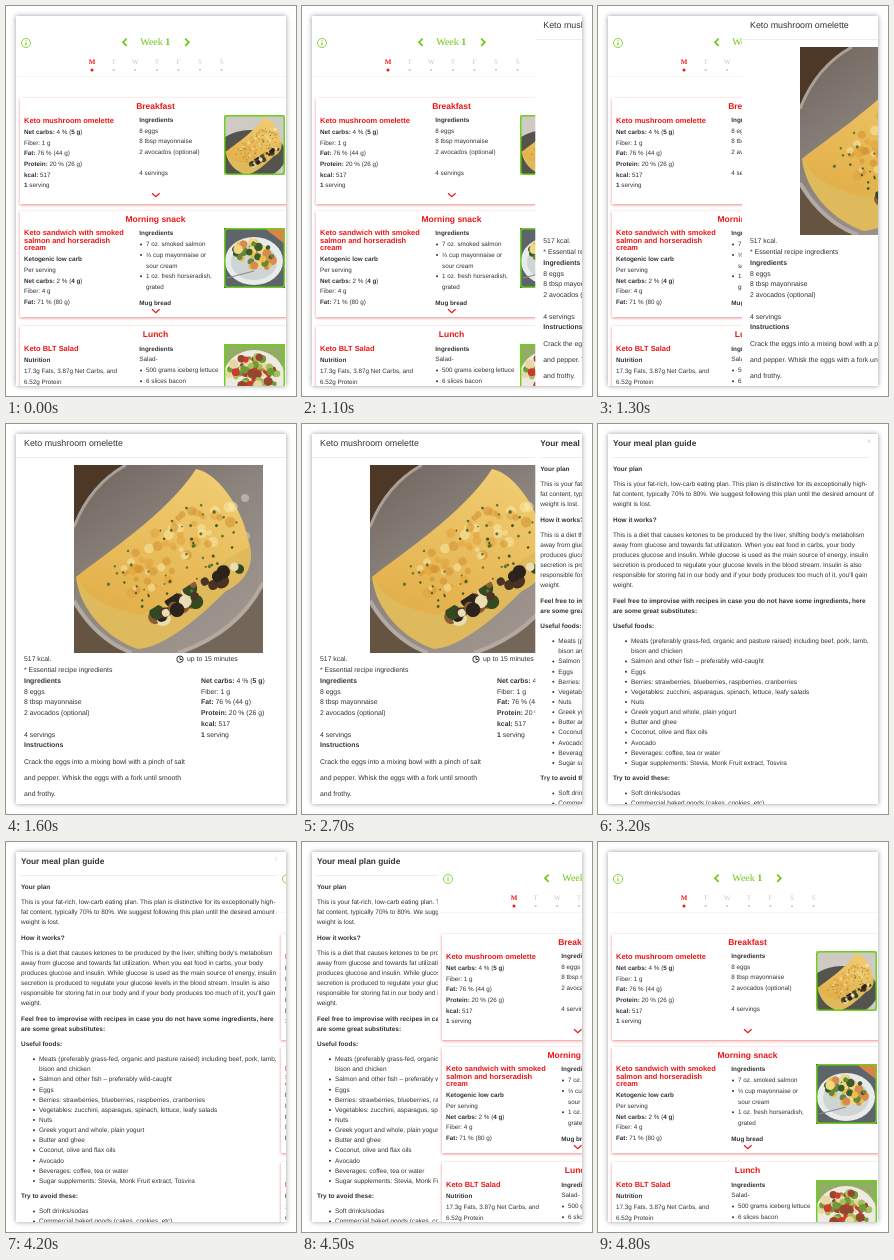
An HTML page that plays this animation: 290 by 390 pixels, repeating every 4900 ms.

```html
<!DOCTYPE html>
<html lang="en">
<head>
<meta charset="utf-8">
<title>Meal plan</title>
<style>
  html, body { margin: 0; width: 100%; height: 100%; overflow: hidden; background: #fff; }
  #stage { position: absolute; left: 0; top: 0; width: 290px; height: 390px; }
  #frame { position: absolute; left: 10px; top: 10px; width: 270px; height: 370px; box-shadow: 0 0 5px rgba(0, 0, 0, .4); }
  text { font-family: "Liberation Sans", Arial, sans-serif; fill: #333; white-space: pre; text-rendering: geometricPrecision; }
  .serif { font-family: "Liberation Serif", "Times New Roman", serif; }
  .red { fill: #ee1515; font-weight: 700; }
  .mid { text-anchor: middle; }
  .card { fill: #fff; filter: drop-shadow(0 1.5px 1.5px rgba(225, 60, 60, .6)); }
  .line { fill: none; stroke-width: 1.2; }
</style>
</head>
<body>
<div id="frame"></div>
<svg id="stage" viewBox="0 0 290 390"></svg>
<script>
const stage = document.getElementById('stage');

// Underscores mark bold runs; y is the middle of the line.
const text = (x, y, s, size, cls = '') =>
  `<text x="${x}" y="${y + size * .36}" font-size="${size}" class="${cls}">` +
  s.replace(/_(.+?)_/g, '<tspan font-weight="700">$1</tspan>') + '</text>';

const rows = (x, y, step, size, lines, cls) => lines.map((s, i) => {
  const bullet = s.startsWith('•');
  const dot = bullet ? circle(x - 5, y + i * step + .4, 1, '#333') : '';
  return dot + (s && text(x, y + i * step, bullet ? s.slice(1) : s, size, cls));
}).join('');

const circle = (x, y, r, fill, extra = '') => `<circle cx="${x}" cy="${y}" r="${r}" fill="${fill}" ${extra}/>`;
const rect = (x, y, w, h, fill) => `<rect x="${x}" y="${y}" width="${w}" height="${h}" fill="${fill}"/>`;
const path = (d, fill, extra = '') => `<path d="${d}" fill="${fill}" ${extra}/>`;
const line = (d, color, width = 1.2) => `<path d="${d}" class="line" stroke="${color}" style="stroke-width:${width}"/>`;

function random(seed) {
  return () => (seed = seed * 16807 % 2147483647) / 2147483647;
}

// Scatter small spots inside a tilted ellipse.
function spots(n, cx, cy, rx, ry, tilt, size, colors, seed) {
  const rnd = random(seed);
  for (let i = 0; i < 5; i++) rnd();
  let out = '';
  for (let i = 0; i < n; i++) {
    const a = rnd() * 6.283, d = Math.sqrt(rnd());
    out += circle((Math.cos(a) * d * rx).toFixed(1), (Math.sin(a) * d * ry).toFixed(1),
      (size * (.5 + rnd() * .7)).toFixed(1), colors[i % colors.length]);
  }
  return `<g transform="translate(${cx} ${cy}) rotate(${tilt})">${out}</g>`;
}

const photo = (x, y, w, h, body) => `<svg x="${x}" y="${y}" width="${w}" height="${h}">${body}</svg>`;
const thumb = (y, body) => photo(218, y, 61, 60, body) +
  `<rect x="218.7" y="${y + .7}" width="59.6" height="58.6" rx="3" class="line" stroke="#6cd01c" style="stroke-width:1.5"/>`;

const omelette =
  path('M2 112C6 146 34 174 64 184C92 182 128 150 152 126C174 116 182 96 174 74Z', '#dfba5c') +
  spots(34, 118, 130, 58, 9, -31, 6.5, ['#4a3322', '#eadcb4', '#2c241c', '#8a5c36', '#33491f'], 5) +
  path('M2 112C32 88 94 48 122 4C145 8 172 48 175 82C154 92 112 124 68 150C44 146 14 136 2 112Z', 'url(#egg)') +
  spots(60, 102, 82, 72, 24, -38, 4.5, ['#d18f2e88', '#fae9a888', '#e0a23a88'], 11) +
  spots(50, 100, 92, 78, 38, -36, 1.5, ['#3f5a22', '#5d7432'], 23);

const bigPhoto = photo(68, 41, 189, 188,
  rect(0, 0, 189, 188, 'url(#pan)') +
  path('M0 0H52Q16 20 0 62Z', '#4d3828') + line('M52 0Q16 20 0 62', '#aaa097', 3) +
  path('M0 136Q22 174 58 188H0Z', '#665443') + line('M0 136Q22 174 58 188', '#b3aaa3', 4) +
  path('M189 118Q164 168 104 188H189Z', '#75665a') + line('M189 118Q164 168 104 188', '#b5aaa1', 4) +
  circle(171, 33, 4, '#b8afa8') + circle(172, 71, 4, '#b8afa8') + omelette);

const thumbs = [
  rect(0, 0, 61, 60, '#cfcac4') +
  '<ellipse cx="26" cy="40" rx="36" ry="25" fill="#55534d"/>' +
  `<g transform="translate(1 1) scale(.32)">${omelette}</g>`,

  rect(0, 0, 61, 60, '#5d656b') + path('M40 0H61V16Z', '#d98446') +
  '<ellipse cx="30" cy="33" rx="29" ry="24" fill="#e9ebea"/><ellipse cx="30" cy="34" rx="23" ry="18" fill="#cfd4d4"/>' +
  spots(48, 30, 27, 20, 14, 15, 4, ['#e9bf4a', '#f2d77e', '#66883a', '#d98a4c', '#385c2b'], 17) +
  line('M3 50L30 43', '#8d8d8d'),

  rect(0, 0, 61, 60, '#8fae62') +
  '<ellipse cx="30" cy="34" rx="31" ry="28" fill="#eeeae3"/>' +
  spots(75, 31, 29, 26, 18, 0, 4, ['#6e9a38', '#c93b2c', '#e8d7a0', '#a6bf5a', '#96452f'], 29)
];

const red = '#ee1515', green = '#6cc811';
const chevron = y => line(`M146 ${y - 1.7}L149.8 ${y + 1.7}L153.6 ${y - 1.7}`, red);
const card = (y, title) =>
  `<rect class="card" x="14" y="${y}" width="275" height="106"/>` + text(149.5, y + 7.7, title, 8.5, 'red mid');

const days = [...'MTWTFSS'].map((d, i) => {
  const x = 86 + i * 21.6, on = !i;
  const color = on ? red : '#c8c8c8';
  return `<text x="${x}" y="58" font-size="7" class="serif mid" style="fill:${color};font-weight:${on ? 700 : 400}">${d}</text>` +
    circle(x, 64, on ? 1.5 : 1.1, color);
}).join('');

const macros = ['_Net carbs:_ 4 % (_5 g_)', 'Fiber: 1 g', '_Fat:_ 76 % (44 g)', '_Protein:_ 20 % (26 g)', '_kcal:_ 517', '_1_ serving'];
const omeletteItems = ['_Ingredients_', '8 eggs', '8 tbsp mayonnaise', '2 avocados (optional)', '', '4 servings'];

const S = 6.3;
const week =
  circle(20, 37, 4.5, 'none', `stroke="${green}" stroke-width=".8"`) +
  circle(20, 34.8, .6, green) + line('M20 36.3V39.6', green, 1) +
  line('M120.6 32.6L117 36.2L120.6 39.8M179.2 32.6L182.8 36.2L179.2 39.8', green, 1.7) +
  `<text x="134.3" y="39" font-size="10" class="serif" style="fill:${green}">Week <tspan font-weight="700">1</tspan></text>` +
  days + rect(12, 70, 268, .7, '#f1f1f1') +

  card(92, 'Breakfast') + text(18, 114, 'Keto mushroom omelette', 7.46, 'red') +
  rows(18, 125.7, 10.7, S, macros) + rows(133.3, 114, 10.6, S, omeletteItems) + chevron(189) + thumb(109, thumbs[0]) +

  card(205, 'Morning snack') +
  rows(18, 226.7, 7.4, 7.46, ['Keto sandwich with smoked', 'salmon and horseradish', 'cream'], 'red') +
  rows(18, 253, 10.65, S, ['_Ketogenic low carb_', 'Per serving', '_Net carbs:_ 2 % (_4 g_)', 'Fiber: 4 g', '_Fat:_ 71 % (80 g)']) +
  text(133.3, 227, '_Ingredients_', S) +
  rows(140, 238, 10.65, S, ['•7 oz. smoked salmon', '•⅓ cup mayonnaise or', 'sour cream', '•1 oz. fresh horseradish,', 'grated']) +
  text(133.3, 296.3, '_Mug bread_', S) + chevron(305) + thumb(222, thumbs[1]) +

  card(320, 'Lunch') + text(18, 342.5, 'Keto BLT Salad', 7.46, 'red') +
  rows(18, 353.8, 10.9, S, ['_Nutrition_', '17.3g Fats, 3.87g Net Carbs, and', '6.52g Protein']) +
  rows(133.3, 342.5, 10.7, S, ['_Ingredients_', 'Salad-']) +
  rows(140, 364.2, 10.7, S, ['•500 grams iceberg lettuce', '•6 slices bacon']) + thumb(338, thumbs[2]);

const R = 6.87;
const recipe =
  text(18, 18.6, 'Keto mushroom omelette', 8.86) + rect(10, 33, 270, .8, '#e9e9e9') + bigPhoto +
  rows(18, 235, 10.75, R, ['517 kcal.', '* Essential recipe ingredients', ...omeletteItems, '_Instructions_']) +
  circle(174, 235.2, 3.2, 'none', 'stroke="#333" stroke-width="1"') + line('M174 233V235.5H176', '#333', 1) +
  text(181, 235, 'up to 15 minutes', R) +
  rows(195, 256.5, 10.75, R, macros) +
  rows(18, 337.3, 16.1, R, ['Crack the eggs into a mixing bowl with a pinch of salt', 'and pepper. Whisk the eggs with a fork until smooth', 'and frothy.']);

const G = 6.45, L = 10.15;
const guide =
  text(15, 18.6, '_Your meal plan guide_', 8.3) + rect(15, 33, 256, .8, '#e9e9e9') +
  line('M269.5 15.5L273 19M273 15.5L269.5 19', '#ccc', .7) +
  text(15, 45, '_Your plan_', G) +
  rows(15, 59.7, L, G, [
    'This is your fat-rich, low-carb eating plan. This plan is distinctive for its exceptionally high-',
    'fat content, typically 70% to 80%. We suggest following this plan until the desired amount of',
    'weight is lost.']) +
  text(15, 95.2, '_How it works?_', G) +
  rows(15, 110.3, L, G, [
    'This is a diet that causes ketones to be produced by the liver, shifting body\'s metabolism',
    'away from glucose and towards fat utilization. When you eat food in carbs, your body',
    'produces glucose and insulin. While glucose is used as the main source of energy, insulin',
    'secretion is produced to regulate your glucose levels in the blood stream. Insulin is also',
    'responsible for storing fat in our body and if your body produces too much of it, you\'ll gain',
    'weight.']) +
  rows(15, 176.3, L, G, [
    '_Feel free to improvise with recipes in case you do not have some ingredients, here_',
    '_are some great substitutes:_']) +
  text(15, 201.7, '_Useful foods:_', G) +
  rows(33, 216.8, L, G, [
    '•Meats (preferably grass-fed, organic and pasture raised) including beef, pork, lamb,',
    'bison and chicken', '•Salmon and other fish – preferably wild-caught', '•Eggs',
    '•Berries: strawberries, blueberries, raspberries, cranberries',
    '•Vegetables: zucchini, asparagus, spinach, lettuce, leafy salads', '•Nuts',
    '•Greek yogurt and whole, plain yogurt', '•Butter and ghee', '•Coconut, olive and flax oils',
    '•Avocado', '•Beverages: coffee, tea or water',
    '•Sugar supplements: Stevia, Monk Fruit extract, Tosvira']) +
  text(15, 354, '_Try to avoid these:_', G) +
  rows(33, 369, L, G, ['•Soft drinks/sodas', '•Commercial baked goods (cakes, cookies, etc)']);

const page = (id, body) => `<g id="${id}">${rect(10, 10, 290, 370, '#fff')}${body}</g>`;

stage.innerHTML = `<defs>
  <clipPath id="window"><rect x="10" y="10" width="270" height="370"/></clipPath>
  <linearGradient id="pan" x2=".7" y2="1"><stop stop-color="#6f645c"/><stop offset=".5" stop-color="#8d847e"/><stop offset="1" stop-color="#a0968f"/></linearGradient>
  <linearGradient id="egg" x1=".7" y1="0" x2=".3" y2="1"><stop stop-color="#f0cc72"/><stop offset="1" stop-color="#e3b04a"/></linearGradient>
</defs>
<g clip-path="url(#window)">${page('week', week)}${page('recipe', recipe)}${page('guide', guide)}<use id="next" href="#week"/></g>`;

const place = (id, x) => document.getElementById(id).setAttribute('transform', `translate(${x} 0)`);

// Each page moves in from the right in held steps of 100 ms.
function slideIn(t, start, from, step) {
  if (t < start) return 290;
  return Math.max(0, from - step * Math.floor((t - start) / 100));
}

const begin = performance.now();
function draw() {
  const t = (performance.now() - begin) % 4900;
  place('recipe', slideIn(t, 1100, 223.3, 44.66));
  place('guide', slideIn(t, 2700, 223.3, 44.66));
  place('next', t < 4800 ? slideIn(t, 4200, 261, 45) : 0);
  requestAnimationFrame(draw);
}
draw();
</script>
</body>
</html>
```
